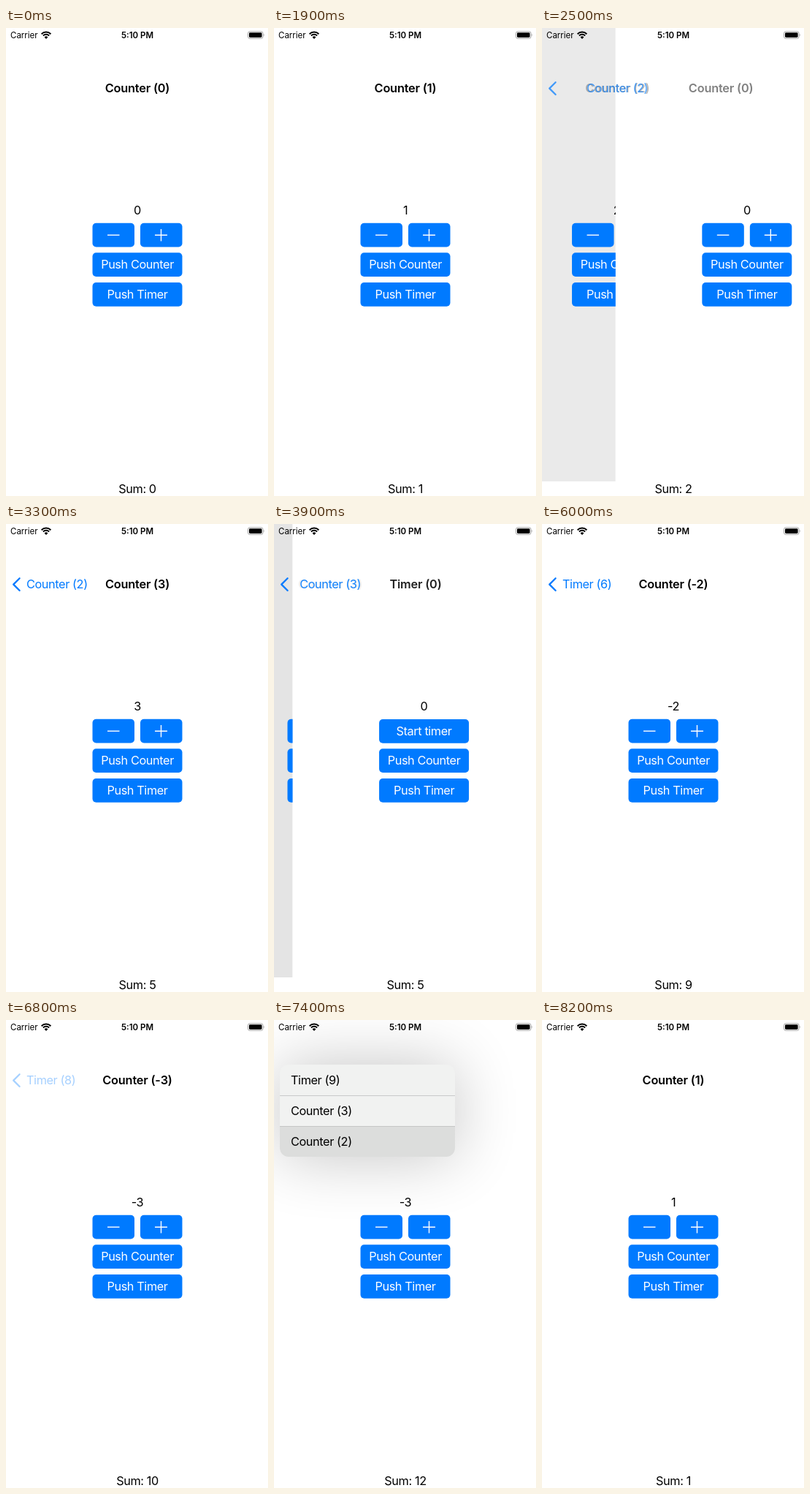
Recreate the animation shown at these times as an HTML page. Size 359 by 640 pixels, loop 8300 ms.

```html
<!DOCTYPE html>
<html lang="en">
<head>
<meta charset="utf-8">
<title>Counter navigation</title>
<style>
  html, body { margin: 0; width: 100%; height: 100%; overflow: hidden; background: #fff; }
  svg { display: block; width: 100vw; height: 100vh; }
  text { font: 400 16.3px Inter, "Liberation Sans", sans-serif; letter-spacing: -.4px; white-space: pre; }
  .bold { font-weight: 600; letter-spacing: -.18px; }
  .small { font-size: 11.5px; letter-spacing: 0; }
  .mid { text-anchor: middle; }
</style>
</head>
<body>
<svg id="stage" viewBox="0 0 359 640" preserveAspectRatio="none"></svg>
<script>
const LOOP = 8300, STEP = 100, W = 359, MID = 180, BOTTOM = 620;
const BLUE = '#007aff';
const SPRING = 0.0548; // per ms
const TICK = 333;
const TIMER_START = 4000, POP = 7455, MENU = 6950;
const PUSHES = [2453.8, 3821.3, 4960];

// Times of taps that change each counter, with the amount.
const TAPS = [
  [[1900, 1], [2100, 1], [8200, -1]],
  [[2900, 1], [3100, 1], [3300, 1]],
  [],
  [[5500, -1], [5800, -1], [6300, -1]]
];

const stage = document.getElementById('stage');
const clamp = v => Math.max(0, Math.min(1, v));
const between = (t, a, b) => t >= a && t < b;

// Part of the way still to go in a critically damped slide.
function rest(t, start) {
  const x = Math.max(0, t - start) * SPRING;
  const r = (1 + x) * Math.exp(-x);
  return r < 0.004 ? 0 : r;
}

const text = (x, y, s, { cls = '', fill = '#000', o = 1 } = {}) =>
  `<text x="${x}" y="${y}" class="${cls}" fill="${fill}" opacity="${o}">${s}</text>`;
const rect = (x, y, w, h, fill, more = '') =>
  `<rect x="${x}" y="${y}" width="${w}" height="${h}" fill="${fill}" ${more}/>`;
const line = (d, color, w, more = '') =>
  `<path d="${d}" fill="none" stroke="${color}" stroke-width="${w}" ${more}/>`;

function button(x, y, w, content, pressed) {
  const face = rect(x, y, w, 32.8, BLUE, 'rx="5"');
  return `<g opacity="${pressed ? 0.75 : 1}">${face}${content}</g>`;
}

const textButton = (y, label, pressed) =>
  button(118.5, y, 123, text(MID, y + 22.2, label, { cls: 'mid', fill: '#fff' }), pressed);

function valueOf(i, t) {
  if (i === 2) return t < TIMER_START ? 0 : Math.floor((t - TIMER_START) / TICK);
  return TAPS[i].reduce((sum, [at, d]) => sum + (t >= at ? d : 0), 0);
}

const nameOf = i => i === 2 ? 'Timer' : 'Counter';
const labelOf = (i, t) => `${nameOf(i)} (${valueOf(i, t)})`;

function page(i, t, x) {
  let top;
  if (i === 2) {
    top = textButton(267, t < TIMER_START ? 'Start timer' : 'Stop timer');
  } else {
    const minus = line('M139 283.2H155.5', '#fff', 1.4);
    const plus = line('M204 283.2H221M212.5 275V291.5', '#fff', 1.4);
    top = button(118.5, 266.7, 57.5, minus, i === 0 && between(t, 8100, 8200)) +
          button(184, 266.7, 57.5, plus);
  }
  const pushCounter = i === 0 && between(t, 2300, 2453) || i === 2 && between(t, 4800, 4960);
  const pushTimer = i === 1 && between(t, 3700, 3821);
  return `<g transform="translate(${x} 0)">` +
    text(MID, 255, valueOf(i, t), { cls: 'mid' }) + top +
    textButton(307.2, 'Push Counter', pushCounter) +
    textButton(348, 'Push Timer', pushTimer) + '</g>';
}

function backLabel(i, t, x, o) {
  return `<g clip-path="url(#bar)">${text(x, 88.3, labelOf(i, t), { fill: BLUE, o })}</g>`;
}

const chevron = o =>
  line('M18.6 74.2L10.2 82.6L18.6 91', BLUE, 2.3,
    `stroke-linecap="round" stroke-linejoin="round" opacity="${o}"`);

// p is how far the current page still is from its place.
function navBar(prev, cur, p, t) {
  const title = (i, x, o) => text(x, 88.3, labelOf(i, t), { cls: 'bold mid', o });
  if (prev < 0) return title(cur, MID, 1);
  const timer = prev === 2;
  const q = p ** 1.12; // titles run slightly ahead of the page
  const x = 28 + (timer ? 117 : 108) * Math.min(1, q * 1.28);
  const held = between(t, 6700, 7455) ? 0.35 : 1;
  let out = '';
  if (p > 0) {
    out += title(prev, x + (timer ? 34 : 42), p);
    if (prev > 0 && t < POP) out += backLabel(prev - 1, t, 28 - 106 * (1 - p), clamp(p * 1.2));
  }
  out += backLabel(prev, t, x, (1 - p) * held);
  out += chevron(prev > 0 && t < POP ? held : 1 - p);
  return out + title(cur, MID + 270 * q, clamp(1 - p * 1.8));
}

function menu(t) {
  const o = t < 7400 ? clamp((t - MENU) / 100) : clamp((7540 - t) / 100);
  if (!o) return '';
  const s = 0.7 + 0.3 * o;
  const rows = [2, 1, 0].map((i, n) => {
    const y = 61 + 42 * n;
    const hot = i === 0 && t >= 7400;
    return (hot ? rect(8, y, 240, 42, '#dcdddc') : '') +
      (n ? line(`M8 ${y + 0.5}H248`, '#bfc1c0', 0.8) : '') +
      text(23, y + 27, labelOf(i, Math.min(t, 7100)));
  }).join('');
  return `<g opacity="${o}" transform="translate(8 61) scale(${s}) translate(-8 -61)">` +
    rect(8, 61, 240, 126, '#000', 'rx="12" opacity=".23" filter="url(#soft)"') +
    `<g clip-path="url(#card)">${rect(8, 61, 240, 126, '#f1f2f1')}${rows}</g></g>`;
}

function statusBar() {
  const arc = r => {
    const d = r * 0.707;
    return line(`M${55 - d} ${14.6 - d}A${r} ${r} 0 0 1 ${55 + d} ${14.6 - d}`, '#000', 2);
  };
  return text(6, 14, 'Carrier', { cls: 'small' }) +
    arc(9) + arc(5.8) + '<path d="M55 15L52.6 12.4A3.4 3.4 0 0 1 57.4 12.4Z"/>' +
    text(MID, 14, '5:10 PM', { cls: 'small bold mid' }) +
    rect(331.5, 4.8, 20.6, 9.6, 'none', 'rx="2.6" stroke="#999" stroke-width=".9"') +
    rect(333, 6.3, 17.6, 6.6, '#000', 'rx="1.4"') +
    '<path d="M353.2 8Q354.8 9.6 353.2 11.2Z" fill="#999"/>';
}

const DEFS = `<defs>
  <clipPath id="bar"><rect x="12" y="60" width="347" height="45"/></clipPath>
  <clipPath id="card"><rect x="8" y="61" width="240" height="126" rx="12"/></clipPath>
  <filter id="soft" x="-60%" y="-115%" width="220%" height="330%" color-interpolation-filters="sRGB">
    <feGaussianBlur stdDeviation="44"/>
  </filter>
</defs>`;

function render(t) {
  let cur = PUSHES.filter(at => t >= at).length;
  let prev = cur - 1;
  let p = cur ? rest(t, PUSHES[prev]) : 0;
  let depth = cur;
  if (t >= POP) {
    p = 1 - rest(t, POP);
    prev = 0;
    depth = 0;
    if (p === 1) { cur = 0; prev = -1; p = 0; }
  }
  let out = DEFS + rect(0, 0, W, 640, '#fff');
  const x = W * p;
  if (p > 0) {
    out += rect(0, 0, x, BOTTOM, '#000', `opacity="${0.115 * (1 - p)}"`) +
      page(prev, t, -0.3 * W * (1 - p)) +
      rect(x, 0, W - x, BOTTOM, '#fff');
  }
  let sum = 0;
  for (let i = 0; i <= depth; i++) sum += valueOf(i, t);
  out += page(cur, t, x) + navBar(prev, cur, p, t) +
    text(MID, 636, `Sum: ${sum}`, { cls: 'mid' }) + menu(t) + statusBar();
  stage.innerHTML = out;
}

const origin = performance.now();
let shown = -1;
function loop() {
  const t = Math.floor((performance.now() - origin) % LOOP / STEP) * STEP;
  if (t !== shown) render(shown = t);
  requestAnimationFrame(loop);
}
loop();
</script>
</body>
</html>
```
